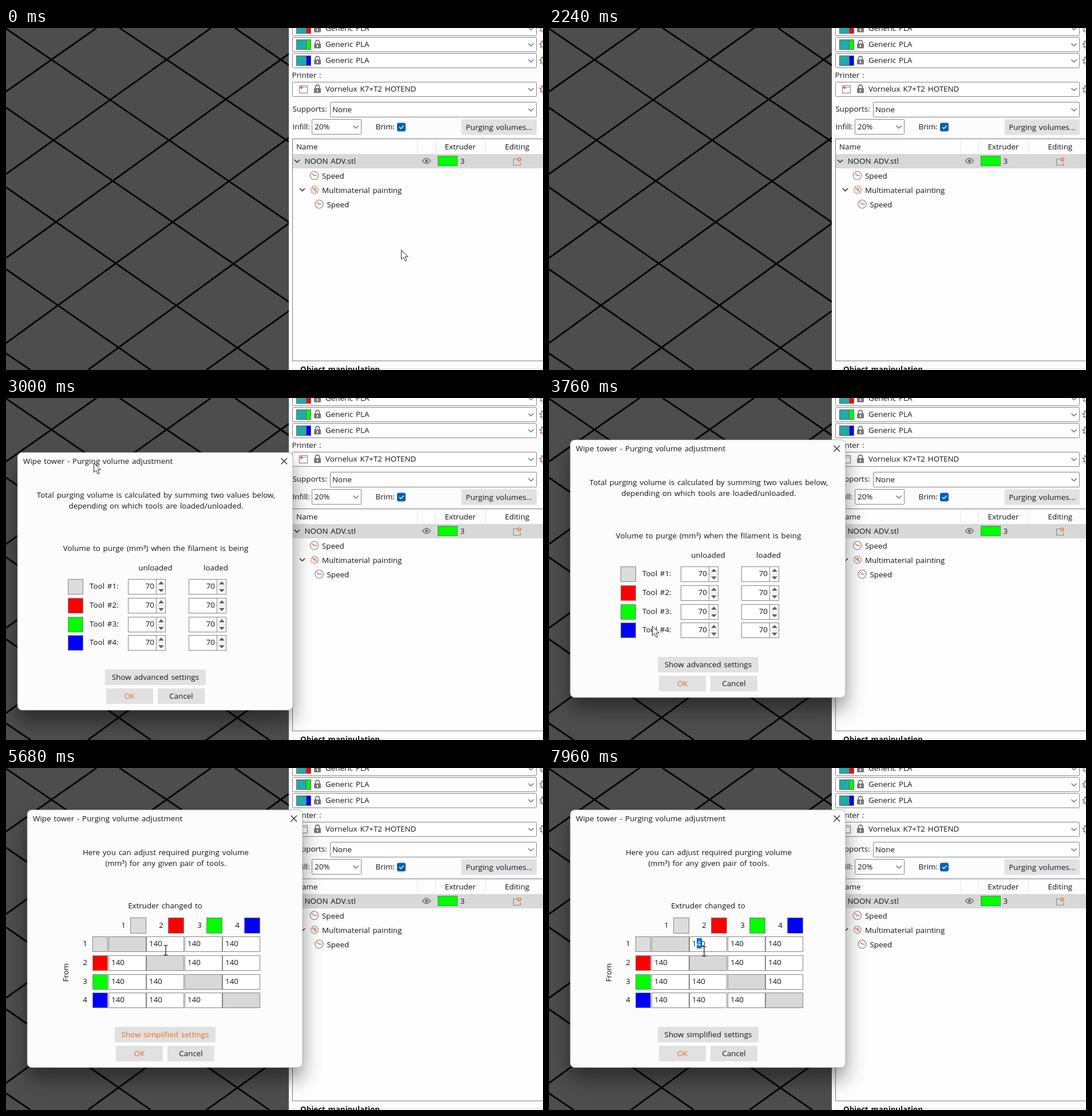
Write an HTML page that moves like this. It is 938 px wide and 597 px high and loops after 8000 ms.

```html
<!DOCTYPE html>
<html lang="en">
<head>
<meta charset="utf-8">
<title>Purging volumes</title>
<style>
html, body { margin: 0; width: 100%; height: 100%; overflow: hidden; background: #fcfcfc; }
svg { display: block; width: 100%; height: 100%; }
text { font: 13.4px "Open Sans", "Noto Sans", sans-serif; word-spacing: 1.3px; fill: #151515; white-space: pre; }
</style>
</head>
<body>
<svg id="stage" viewBox="0 0 938 597" preserveAspectRatio="none"></svg>
<script>
const LOOP = 8000;
const ORANGE = '#ed6b21', EDGE = '#858585', BUTTON = '#e1e1e1', PAGE = '#fcfcfc';
const TOOLS = ['#dcdcdc', '#ff0000', '#00ff00', '#0000ff'];

// Drawing helpers; the y of a label is its visual middle
const rect = (x, y, w, h, fill, stroke = 'none', extra = '') =>
  `<rect x="${x}" y="${y}" width="${w}" height="${h}" fill="${fill}" stroke="${stroke}" ${extra}/>`;
const path = (d, stroke, width = 1, fill = 'none', extra = '') =>
  `<path d="${d}" stroke="${stroke}" stroke-width="${width}" fill="${fill}" ${extra}/>`;
const circle = (x, y, r, fill, stroke = 'none', extra = '') =>
  `<circle cx="${x}" cy="${y}" r="${r}" fill="${fill}" stroke="${stroke}" ${extra}/>`;
const label = (x, y, s, anchor = 'start', extra = '') =>
  `<text x="${x}" y="${y + 4.6}" text-anchor="${anchor}" ${extra}>${s}</text>`;
const mid = (x, y, s, extra) => label(x, y, s, 'middle', extra);
const box = (x, y, w, h, fill = '#fff', stroke = EDGE) => rect(x + .5, y + .5, w - 1, h - 1, fill, stroke);
const chevron = (x, y, color = '#555', width = 1.1) =>
  path(`M${x - 4.5} ${y - 2}l4.5 4.5l4.5 -4.5`, color, width);
const combo = (x, y, w, h) => rect(x + .5, y + .5, w - 1, h - 1, '#fff', EDGE, 'rx="1"') + chevron(x + w - 10, y + h / 2);
const button = (x, y, w, s, extra) => rect(x, y, w, 27, BUTTON) + mid(x + w / 2, y + 13.5, s, extra);

function bed() {
  const lines = [
    [400, 0, 494, 65], [198.5, 0, 494, 198.5], [0, 1, 494, 339], [0, 139, 494, 478],
    [0, 278, 460, 597], [0, 421, 253, 597], [0, 568, 43, 597],
    [0, 111, 158, 0], [0, 255, 358, 0], [0, 401.5, 494, 45], [0, 550, 494, 191.5],
    [143, 597, 494, 341], [350, 597, 494, 494]
  ];
  return rect(0, 0, 494, 597, '#4d4d4d') +
    path(lines.map(([a, b, c, d]) => `M${a} ${b}L${c} ${d}`).join(''), '#000', 2.8);
}

const lock = (x, y) =>
  path(`M${x - 3.5} ${y}v-3a3.5 3.5 0 0 1 7 0v3`, '#777', 1.9) +
  rect(x - 6, y - 1, 12, 8.5, '#777', 'none', 'rx="1"') + rect(x - 1, y + 1.5, 2, 3.5, '#fff');

const gear = y => circle(940, y, 5.5, 'none', '#a0735c', 'stroke-width="1.3"') +
  circle(940, y, 7.2, 'none', '#a0735c', 'stroke-width="2" stroke-dasharray="3 2.6"');

const clock = (x, y) => circle(x, y, 7.2, '#fff', '#7d7d7d', 'stroke-width="1.1"') +
  path(`M${x - 4} ${y - 3.5}L${x} ${y}H${x + 4.5}`, ORANGE, 1.4);

function filament(y, color) {
  return combo(500, y, 427, 26) + rect(507.5, y + 4.5, 17, 17, '#22aaaa', '#666') +
    rect(524.5, y + 4.5, 8, 17, color, '#666') + lock(544, y + 12) +
    label(558, y + 12.5, 'Generic PLA') + gear(y + 13);
}

function sidebar() {
  const dots = x => path(`M${x} 195V219`, '#cfcfcf', 1, 'none', 'stroke-dasharray="1 1"');
  return rect(494, 0, 444, 597, PAGE) +
    filament(-12, TOOLS[1]) + filament(16, TOOLS[2]) + filament(44, TOOLS[3]) +
    label(499.5, 82.5, 'Printer :') + combo(500, 94, 427, 26) +
    rect(512.5, 100.5, 14, 13, '#fff', '#777') + path('M513 103.5H527', '#999') +
    rect(514, 102, 4, 4, ORANGE) + lock(544, 106) +
    label(558, 106.5, 'Vornelux K7+T2 HOTEND') + gear(107) +
    label(500.5, 141.5, 'Supports:') + combo(566, 129, 361, 27) + label(570, 142.5, 'None') +
    label(500.5, 172, 'Infill:') + combo(534, 159, 87, 27) + label(539, 172, '20%') +
    label(645.5, 172, 'Brim:') + rect(683, 165.5, 15, 15, '#005fb8', 'none', 'rx="3"') +
    path('M687 173l2.6 2.7l5 -5.2', '#fff', 1.3) +
    button(795.5, 159.5, 131.5, 'Purging volumes...') +
    rect(500.5, 193.5, 450, 387.5, '#fdfdfd', '#747892') +
    dots(718.5) + dots(750.5) + dots(837.5) +
    label(507, 207, 'Name') + mid(793.5, 207, 'Extruder') + label(871.5, 207, 'Editing') +
    rect(501, 220, 437, 25, '#d8d8d8') +
    chevron(508.5, 232, '#222', 1.5) + label(521.5, 232.5, 'NOON ADV.stl') +
    path('M727.5 232q7 -9 14 0q-7 9 -14 0z', '#707070', 1.4) + circle(734.5, 232, 2.6, '#707070') +
    rect(754.5, 223.5, 34, 17, '#00ff00', '#5b8a5b') + label(793.5, 232.5, '3') +
    path('M893 228.5H886.5V239.5H898.5V235', '#8b8b8b', 1.2) + circle(896.5, 229.5, 2.6, '#f4c7aa', ORANGE, 'stroke-width="1.4"') +
    clock(538.5, 257.5) + label(552, 258, 'Speed') +
    chevron(517.5, 282, '#222', 1.5) +
    circle(539, 282.5, 6.5, '#eee', '#999', 'stroke-width="2" stroke-dasharray="2 1.6"') +
    path('M535 279l8 7M540 279v4', ORANGE, 1.4) + label(552, 283, 'Multimaterial painting') +
    clock(547, 307.5) + label(560.5, 308, 'Speed') +
    path('M499 594.5H507M656 594.5H938', '#dcdcdc') +
    label(514, 596, 'Object manipulation', 'start', 'style="font-weight:700"');
}

function spin(x, y) {
  const cx = x + 58, cy = y + 13.5;
  return box(x, y, 66, 27) + path(`M${x + 49.5} ${y}v27`, EDGE) + label(x + 46, cy - 1.5, '70', 'end') +
    path(`M${cx - 5} ${cy - 4}l5 -5.5l5 5.5z M${cx - 5} ${cy + 4}l5 5.5l5 -5.5z`, 'none', 0, '#606060') +
    path(`M${x + 50} ${cy}h15`, '#d5d5d5');
}

function simplePage() {
  const rows = TOOLS.map((color, i) => {
    const y = 222 + Math.round(i * 32.8);
    return box(87, y, 27, 27, color) + label(125, y + 12.5, `Tool #${i + 1}:`) + spin(192, y) + spin(298, y);
  }).join('');
  return mid(241, 75.5, 'Total purging volume is calculated by summing two values below,') +
    mid(241, 94, 'depending on which tools are loaded/unloaded.') +
    mid(240.5, 168.5, 'Volume to purge (mm³) when the filament is being') +
    mid(240, 202, 'unloaded') + mid(345.5, 202, 'loaded') + rows;
}

function matrixPage() {
  let out = mid(241, 75.5, 'Here you can adjust required purging volume') +
    mid(241, 94, '(mm³) for any given pair of tools.') + mid(240, 168.5, 'Extruder changed to') +
    `<g transform="translate(66 285) rotate(-90)">${mid(0, 0, 'From')}</g>`;
  TOOLS.forEach((color, i) => {
    const hx = Math.round(i * 66.4), y = 222 + Math.round(i * 32.8);
    out += mid(167 + hx, 202, i + 1) + box(179 + hx, 189, 28, 28, color) +
      mid(100, y + 12.5, i + 1) + box(113, y, 27, 27, color);
    for (let j = 0; j < 4; j++) {
      const x = 141 + Math.round(j * 66.4), picked = i === 0 && j === 1;
      out += box(x, y, 66, 27, i === j ? '#d8d8d8' : '#fff');
      if (picked) out += rect(220, 225, 9, 18, '#0078d7', 'none', 'id="mark"');
      if (i !== j) out += label(x + 5, y + 12, picked ? '1<tspan id="digit">4</tspan>0' : '140');
    }
  });
  return out;
}

function dialog() {
  return rect(-1, 1, 481, 450, '#000', 'none', 'rx="10" opacity=".42" filter="url(#soft)"') +
    rect(-1, 1, 481, 450, PAGE, '#8a8a8a', 'rx="8" stroke-width=".6"') +
    label(9, 16.5, 'Wipe tower - Purging volume adjustment') +
    path('M459.5 11l10.5 10.5m0 -10.5l-10.5 10.5', '#222', 1.2) +
    `<g id="simple">${simplePage()}</g><g id="matrix">${matrixPage()}</g>` +
    button(152, 380, 176, 'Show advanced settings', 'id="toggle"') +
    button(154, 413, 82, 'OK', `style="fill:${ORANGE}"`) + button(244, 413, 82, 'Cancel');
}

const $ = id => document.getElementById(id);
$('stage').innerHTML =
  '<defs><filter id="soft" x="-20%" y="-20%" width="140%" height="145%"><feOffset dy="20"/><feGaussianBlur stdDeviation="17"/></filter></defs>' +
  bed() + sidebar() + `<g id="dialog">${dialog()}</g>` +
  `<g id="arrow">${path('M.5 .5V16.8L4.4 13.2L7.2 19.7L10 18.5L7.2 12.2H12.3Z', '#222', 1, '#fff')}</g>` +
  `<g id="beam">${path('M-3.5 -8.5H-1L0 -7.5L1 -8.5H3.5M0 -7.5V7.5M-3.5 8.5H-1L0 7.5L1 8.5H3.5', '#111', 1.2)}</g>`;

// Keys are [time, x, y], eased in between
function along(keys, t) {
  let i = 0;
  while (i < keys.length - 1 && t >= keys[i + 1][0]) i++;
  const a = keys[i], b = keys[i + 1] || a;
  const k = Math.max(0, Math.min(1, (t - a[0]) / (b[0] - a[0] || 1)));
  const e = k * k * (3 - 2 * k);
  return [a[1] + (b[1] - a[1]) * e, a[2] + (b[2] - a[2]) * e];
}

const OPEN = 2400, SWITCH = 4240, FOCUS = 6600;
const frameKeys = [[0, 2, 118], [2800, 2, 118], [3000, 21, 94], [3240, 38, 72]];
const mouseKeys = [
  [0, 690, 387], [500, 690, 387], [1400, 853, 176], [2300, 853, 176],
  [2720, 134, 137], [2800, 134, 137], [3000, 153, 113], [3240, 170, 91], [3320, 170, 91],
  [3760, 180, 398], [4160, 235, 464], [4600, 235, 464], [5400, 279, 318],
  [6100, 279, 318], [6500, 259, 320], [6800, 259, 320], [7400, 271, 320]
];

const show = (id, on) => $(id).setAttribute('visibility', on ? 'visible' : 'hidden');
const move = (id, [x, y]) => $(id).setAttribute('transform', `translate(${Math.round(x)} ${Math.round(y)})`);

function draw(t) {
  const open = t >= OPEN, advanced = t >= SWITCH, mouse = along(mouseKeys, t);
  $('dialog').style.display = open ? '' : 'none';
  move('dialog', along(frameKeys, t));
  $('simple').style.display = advanced ? 'none' : '';
  $('matrix').style.display = advanced ? '' : 'none';
  $('toggle').textContent = advanced ? 'Show simplified settings' : 'Show advanced settings';
  $('toggle').style.fill = advanced && t < FOCUS ? ORANGE : '';

  const marked = t > FOCUS && mouse[0] > 263;
  $('mark').style.display = marked ? '' : 'none';
  $('digit').style.fill = marked ? '#fff' : '';

  const overCell = advanced && mouse[1] < 322;
  show('arrow', !overCell && (t < 2000 || t >= OPEN));
  show('beam', overCell);
  move('arrow', mouse);
  move('beam', mouse);
}

const start = performance.now();
function tick() {
  draw((performance.now() - start) % LOOP);
  requestAnimationFrame(tick);
}
draw(0);
requestAnimationFrame(tick);
</script>
</body>
</html>
```
